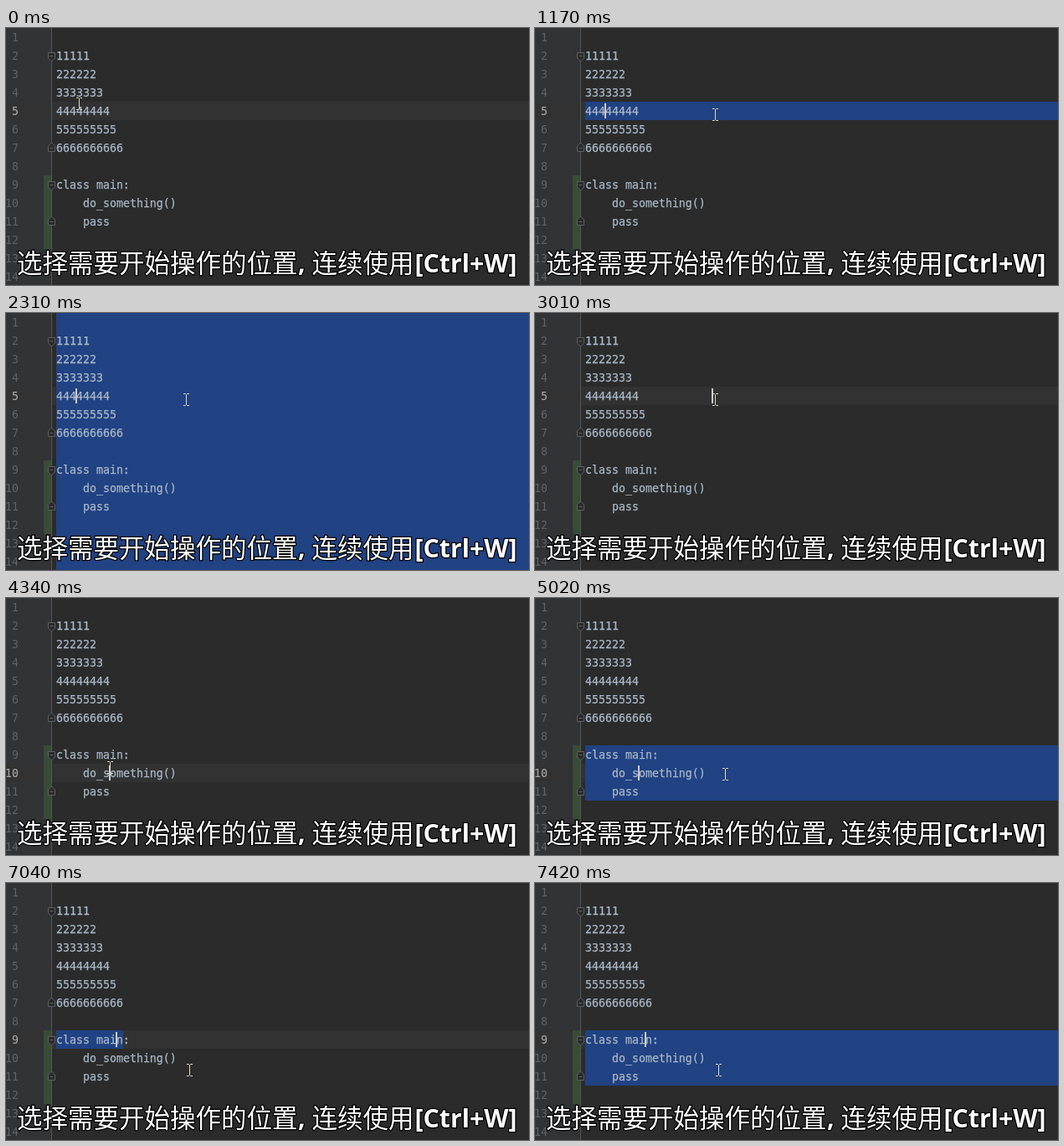
An HTML page that plays this animation: 625x307 px, repeating every 8 s.

```html
<!DOCTYPE html>
<html lang="zh-CN">
<head>
<meta charset="utf-8">
<title>Extend selection</title>
<style>
  html, body { margin: 0; width: 100%; height: 100%; overflow: hidden; background: #2b2b2b; }
  svg { display: block; }
  .mono { font: 13.288px "DejaVu Sans Mono", "Noto Sans Mono", monospace; }
  #code { fill: #a9b7c6; stroke: #a9b7c6; stroke-width: .25px; }
  #dim { fill: #606366; text-anchor: end; }
  #lit { fill: #a4a3a3; text-anchor: end; }
  .caption {
    font: 30.5px "Noto Sans CJK SC", "Noto Sans CJK", sans-serif;
    fill: #fff; stroke: #000; stroke-width: 2.5px; stroke-linejoin: round; paint-order: stroke;
  }
  .caption .keys { font: bold 30.3px "Open Sans", "Noto Sans", sans-serif; }
  .fold { fill: #2b2b2b; stroke: #5c5f61; }

  .row, #sel, #caret, #beam, #arrow { animation: 8s step-end infinite; }
  .row { fill: #323232; animation-name: row; }
  #sel { fill: #214283; animation-name: sel; }
  #caret { fill: #ccc; animation-name: caret; }
  #pointer { animation: pointer 8s infinite; }
  #beam { animation-name: beam; }
  #arrow { animation-name: arrow; }

  @keyframes row {
    0% { y: 88px; }
    54.25% { y: 198px; }
    75.375%, 100% { y: 176px; }
  }
  @keyframes sel {
    0% { x: 60px; y: 88px; width: 0; height: 22px; }
    6.625% { x: 60px; y: 88px; width: 64px; height: 22px; }
    14.625% { x: 60px; y: 88px; width: 565px; height: 22px; }
    21.5% { x: 60px; y: 22px; width: 565px; height: 132px; }
    28.875% { x: 60px; y: 0; width: 565px; height: 307px; }
    36.75% { x: 60px; y: 0; width: 0; height: 22px; }
    58.125% { x: 92px; y: 198px; width: 96px; height: 22px; }
    60% { x: 92px; y: 198px; width: 112px; height: 22px; }
    61.25% { x: 60px; y: 198px; width: 565px; height: 22px; }
    62.75% { x: 60px; y: 176px; width: 565px; height: 66px; }
    75.375% { x: 60px; y: 176px; width: 0; height: 22px; }
    81% { x: 108px; y: 176px; width: 32px; height: 22px; }
    88% { x: 60px; y: 176px; width: 80px; height: 22px; }
    92.75%, 100% { x: 60px; y: 176px; width: 565px; height: 66px; }
  }
  @keyframes caret {
    0%, 6.625%, 21.5% { x: 83px; y: 90px; opacity: 0; }
    1%, 12.5%, 26% { x: 83px; y: 90px; opacity: 1; }
    36.75%, 49.375% { x: 211px; y: 90px; opacity: 1; }
    43.75% { x: 211px; y: 90px; opacity: 0; }
    54.25%, 62.75% { x: 123px; y: 200px; opacity: 1; }
    60.875% { x: 123px; y: 200px; opacity: 0; }
    75.375%, 100% { x: 131px; y: 178px; opacity: 1; }
  }
  @keyframes pointer {
    0% { transform: translate(87px, 91px); animation-timing-function: step-end; }
    2.125% { transform: translate(89px, 91px); }
    4.75% { transform: translate(89px, 91px); animation-timing-function: steps(5, start); }
    9.4375% { transform: translate(215px, 104px); }
    39.75% { transform: translate(215px, 104px); animation-timing-function: steps(4, start); }
    43.66% { transform: translate(120px, 212px); animation-timing-function: steps(3, start); }
    46.6% { transform: translate(102px, 200px); }
    48.5% { transform: translate(102px, 200px); animation-timing-function: steps(3, start); }
    51.125% { transform: translate(121px, 199px); animation-timing-function: step-end; }
    52.125% { transform: translate(124px, 203px); }
    57.125% { transform: translate(124px, 203px); animation-timing-function: steps(5, start); }
    61.8125% { transform: translate(227px, 211px); }
    71.5% { transform: translate(227px, 211px); animation-timing-function: steps(4, start); }
    75.34% { transform: translate(131px, 195px); }
    80.125% { transform: translate(131px, 195px); animation-timing-function: steps(4, start); }
    83.96%, 100% { transform: translate(219px, 224px); }
  }
  @keyframes beam {
    0%, 80.125%, 100% { opacity: 1; }
    71.5% { opacity: 0; }
  }
  @keyframes arrow {
    0%, 80.125%, 100% { opacity: 0; }
    71.5% { opacity: 1; }
  }
</style>
</head>
<body>
<svg width="625" height="307" viewBox="0 0 625 307">
  <defs>
    <clipPath id="current"><rect class="row" width="625" height="22"/></clipPath>
    <g id="fold">
      <path class="fold" d="M-4-5H4V1.5L0 5.5L-4 1.5Z"/>
      <path class="fold" d="M-2-1H2"/>
    </g>
  </defs>

  <rect width="625" height="307" fill="#2b2b2b"/>
  <rect width="54" height="307" fill="#313335"/>
  <rect class="row" width="625" height="22"/>
  <rect x="45" y="176" width="9" height="88" fill="#384c38"/>
  <rect x="54" width="1" height="307" fill="#555"/>
  <rect id="sel"/>
  <use href="#fold" transform="translate(54.5 34.5)"/>
  <use href="#fold" transform="translate(54.5 142.5) scale(1 -1)"/>
  <use href="#fold" transform="translate(54.5 188.5)"/>
  <use href="#fold" transform="translate(54.5 230.5) scale(1 -1)"/>

  <g id="dim" class="mono"></g>
  <g clip-path="url(#current)"><g id="lit" class="mono"></g></g>
  <g id="code" class="mono"></g>
  <rect id="caret" width="2" height="18"/>

  <g id="pointer">
    <path id="beam" d="M-3-7.5H-.5L.5-6.5L1.5-7.5H4M.5-6.5V5.5M-3 6.5H-.5L.5 5.5L1.5 6.5H4" fill="none" stroke="#e0d8c0"/>
    <path id="arrow" d="M0-.5V16.5L4 13L6.7 19L9.3 17.9L6.7 12H12Z" fill="#fff" stroke="#000"/>
  </g>

  <g class="caption">
    <text x="13" y="291.5">选择需要开始操作的位置</text>
    <text class="keys" x="349" y="291">,</text>
    <text x="365.5" y="291.5">连续使用</text>
    <text class="keys" x="488.5" y="291.5">[Ctrl+W]</text>
  </g>
</svg>
<script>
  const code = ['', '11111', '222222', '3333333', '44444444', '555555555', '6666666666', '',
    'class main:', '    do_something()', '    pass', '', '', ''];

  function addLine(id, x, line, str) {
    const text = document.createElementNS('http://www.w3.org/2000/svg', 'text');
    text.setAttribute('x', x);
    text.setAttribute('y', line * 22 + 16);
    text.textContent = str;
    document.getElementById(id).append(text);
  }

  code.forEach((str, i) => {
    const indent = str.search(/\S|$/);
    addLine('dim', 15, i, i + 1);
    addLine('lit', 15, i, i + 1);
    addLine('code', 60 + indent * 8, i, str.trim());
  });
</script>
</body>
</html>
```
